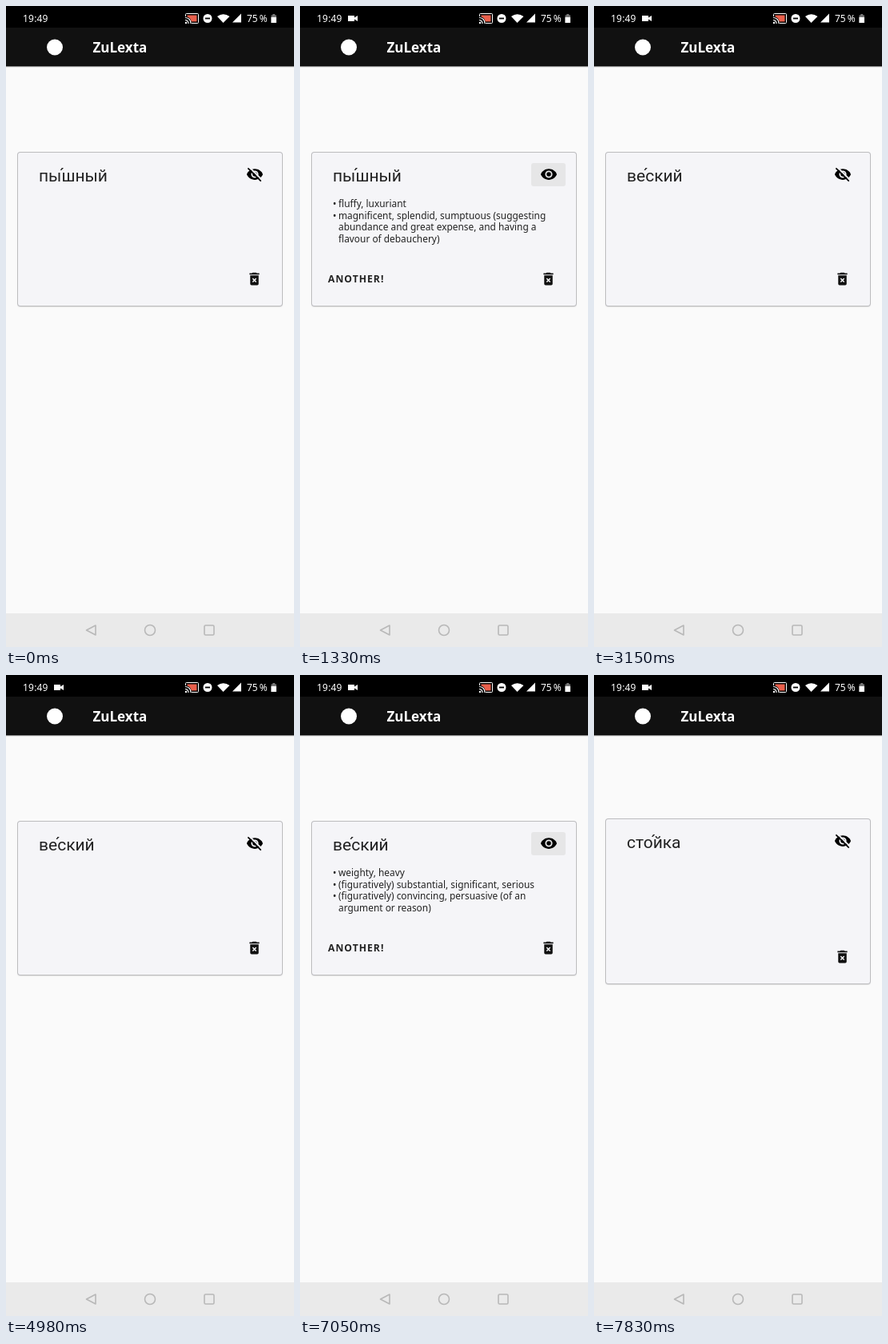
These frames come from a looping animation (360x800 px, 8000 ms). An HTML page:

```html
<!DOCTYPE html>
<html lang="en">
<head>
<meta charset="utf-8">
<title>Vocabulary cards</title>
<style>
  html, body { margin: 0; width: 100%; height: 100%; overflow: hidden; background: #fafafa; }
  * { box-sizing: border-box; }
  body { position: relative; font-family: "Noto Sans", sans-serif; color: #222; }
  .stage { position: absolute; left: 0; top: 0; width: 360px; height: 800px; overflow: hidden; background: #fafafa; }
  .chrome { position: absolute; left: 0; top: 0; }

  .card {
    position: absolute; left: 14px; top: 182px; width: 332px; height: 193px;
    border-radius: 4px; background: #f5f5f8; white-space: nowrap;
    box-shadow: inset 0 0 0 1px #bcbcbe, 0 1px 1px rgba(0, 0, 0, .1);
  }
  .word {
    position: absolute; left: 27px; top: 18px;
    font: 21px/24px Roboto, sans-serif;
  }
  .word i { display: inline-block; width: 0; font-style: normal; position: relative; left: -3px; top: -2px; }
  .defs {
    position: absolute; left: 34px; top: 57.4px; margin: 0; padding: 0;
    list-style: none; font-size: 11.9px; line-height: 14.4px;
  }
  .defs li { position: relative; }
  .defs li::before { content: "•"; position: absolute; left: -7px; }
  .eye { position: absolute; left: 275px; top: 14px; width: 43px; height: 29px; border-radius: 3px; overflow: hidden; }
  .eye svg { position: absolute; left: 10.5px; top: 3.3px; width: 22px; height: 22px; }
  .off { --bg: #f5f5f8; }
  .on { --bg: #e6e6e7; background: var(--bg); }
  .foot { position: absolute; left: 0; bottom: 0; width: 332px; height: 50px; }
  .another {
    position: absolute; left: 13px; top: 1px; width: 86px; height: 30px; padding: 6.5px 8px;
    border-radius: 3px; overflow: hidden; font: 600 12.2px/16.3px "Noto Sans", sans-serif; letter-spacing: 1px;
  }
  .trash { position: absolute; left: 286px; top: 4.5px; width: 21px; height: 21px; }
  .ripple {
    position: absolute; left: 50%; top: 50%; width: 100px; height: 100px; margin: -50px;
    border-radius: 50%; background: #000; opacity: 0;
  }

  /* 1% of the loop is 80 ms */
  .c1, .c2, .c3, .card .eye, .defs, .foot, .another, .ripple, .rec { animation: 8s linear infinite; }
  .card .defs, .card .eye, .card .foot, .card .another { animation-timing-function: step-end; }
  .c1 { animation-name: slide1, fold1; animation-timing-function: linear, step-end; }
  .c2 { animation-name: slide2, fold2; animation-timing-function: linear, step-end; }
  .c3 { top: 179px; height: 207px; animation-name: slide3; }
  .c1 .defs, .c1 .on, .c1 .another { animation-name: show1; }
  .c2 .defs, .c2 .on, .c2 .another { animation-name: show2; }
  .c1 .off { animation-name: hide1; }
  .c2 .off { animation-name: hide2; }
  .c1 .foot { animation-name: drop1; }
  .c2 .foot { animation-name: drop2; }
  .c1 .on .ripple { animation-name: tapEye1; }
  .c2 .on .ripple { animation-name: tapEye2; }
  .c1 .another .ripple { animation-name: tapNext1; }
  .c2 .another .ripple { animation-name: tapNext2; }
  .rec { animation-name: rec; }

  @keyframes rec { 0%, .75% { opacity: 0; } 3.75%, 100% { opacity: 1; } }

  @keyframes show1 { 0% { opacity: 0; } 11.25%, 100% { opacity: 1; } }
  @keyframes hide1 { 0% { opacity: 1; } 11.25%, 100% { opacity: 0; } }
  @keyframes show2 { 0% { opacity: 0; } 63.3%, 100% { opacity: 1; } }
  @keyframes hide2 { 0% { opacity: 1; } 63.3%, 100% { opacity: 0; } }

  @keyframes drop1 { 0% { opacity: 1; } 34.6%, 100% { opacity: 0; } }
  @keyframes drop2 { 0% { opacity: 1; } 92.35%, 100% { opacity: 0; } }
  @keyframes fold1 { 0% { top: 182px; height: 193px; } 34.6%, 100% { top: 187px; height: 166px; } }
  @keyframes fold2 { 0% { top: 182px; height: 193px; } 92.35%, 100% { top: 187px; height: 166px; } }

  @keyframes slide1 {
    0% { transform: none; }
    35.5% { transform: none; animation-timing-function: ease-in; }
    37.4%, 100% { transform: translateX(-362px); }
  }
  @keyframes slide2 {
    0%, 37.3% { transform: translateX(362px); animation-timing-function: ease-out; }
    39.3% { transform: none; }
    93.25% { transform: none; animation-timing-function: ease-in; }
    95.3%, 100% { transform: translateX(-362px); }
  }
  @keyframes slide3 {
    0%, 95.2% { transform: translateX(362px); animation-timing-function: ease-out; }
    97.8%, 100% { transform: none; }
  }

  @keyframes tapEye1 {
    0%, 10.3% { transform: scale(0); opacity: .14; }
    13% { transform: scale(.55); opacity: .1; }
    14.75%, 100% { transform: scale(.55); opacity: 0; }
  }
  @keyframes tapEye2 {
    0%, 62.3% { transform: scale(0); opacity: .14; }
    65.2% { transform: scale(.55); opacity: .1; }
    67.1%, 100% { transform: scale(.55); opacity: 0; }
  }
  @keyframes tapNext1 {
    0%, 30.4% { transform: scale(0); opacity: .12; }
    33% { transform: scale(1); opacity: .1; }
    34.6%, 100% { transform: scale(1); opacity: 0; }
  }
  @keyframes tapNext2 {
    0%, 88.3% { transform: scale(0); opacity: .12; }
    90.8% { transform: scale(1); opacity: .1; }
    92.35%, 100% { transform: scale(1); opacity: 0; }
  }
</style>
</head>
<body>
<svg width="0" height="0" style="position:absolute">
  <symbol id="open" viewBox="0 0 24 24">
    <path d="M1 12C2.7 7.6 7 4.5 12 4.5S21.3 7.6 23 12C21.3 16.4 17 19.5 12 19.5S2.7 16.4 1 12Z"/>
    <circle cx="12" cy="12" r="4" fill="none" style="stroke:var(--bg)" stroke-width="2"/>
  </symbol>
  <symbol id="shut" viewBox="0 0 24 24">
    <use href="#open"/>
    <path d="M4.2 2L22.6 20.4" style="stroke:var(--bg)" stroke-width="2"/>
    <path d="M2.6 3.6L20.4 21.4" stroke="#000" stroke-width="1.8"/>
  </symbol>
  <symbol id="bin" viewBox="0 0 24 24">
    <path d="M6 7H18V19Q18 21 16 21H8Q6 21 6 19ZM5 4H8.5L9.5 3H14.5L15.5 4H19V6H5Z" fill="#111"/>
    <path d="M9.5 11.5L14.5 16.5M14.5 11.5L9.5 16.5" stroke="#f5f5f8" stroke-width="1.8"/>
  </symbol>
</svg>

<div class="stage">
  <section class="card c1">
    <div class="word">пы<i>´</i>шный</div>
    <div class="eye off"><svg><use href="#shut"/></svg></div>
    <div class="eye on"><svg><use href="#open"/></svg><span class="ripple"></span></div>
    <ul class="defs">
      <li>fluffy, luxuriant</li>
      <li>magnificent, splendid, sumptuous (suggesting<br>abundance and great expense, and having a<br>flavour of debauchery)</li>
    </ul>
    <div class="foot">
      <div class="another">ANOTHER!<span class="ripple"></span></div>
      <svg class="trash"><use href="#bin"/></svg>
    </div>
  </section>

  <section class="card c2">
    <div class="word">ве<i>´</i>ский</div>
    <div class="eye off"><svg><use href="#shut"/></svg></div>
    <div class="eye on"><svg><use href="#open"/></svg><span class="ripple"></span></div>
    <ul class="defs">
      <li>weighty, heavy</li>
      <li>(figuratively) substantial, significant, serious</li>
      <li>(figuratively) convincing, persuasive (of an<br>argument or reason)</li>
    </ul>
    <div class="foot">
      <div class="another">ANOTHER!<span class="ripple"></span></div>
      <svg class="trash"><use href="#bin"/></svg>
    </div>
  </section>

  <section class="card c3">
    <div class="word">сто<i>´</i>йка</div>
    <div class="eye off"><svg><use href="#shut"/></svg></div>
    <div class="foot"><svg class="trash"><use href="#bin"/></svg></div>
  </section>

  <svg class="chrome" width="360" height="800" viewBox="0 0 360 800" font-family="'Noto Sans', sans-serif" fill="#fff">
    <rect y="75" width="360" height="1" fill="#8a8a8a"/>
    <rect y="76" width="360" height="1" fill="#e8e8e8"/>
    <rect width="360" height="75" fill="#111"/>
    <rect width="360" height="27" fill="#000"/>

    <!-- status bar -->
    <text x="21" y="19.5" font-size="12" letter-spacing=".2">19:49</text>
    <path class="rec" d="M60 12H68V14.5L72 12V19L68 16.5V19H60Z"/>
    <rect x="224.5" y="9.5" width="16" height="12" rx="1" fill="none" stroke="#fff"/>
    <rect x="226.5" y="11.5" width="12" height="8" fill="#e9604c"/>
    <path d="M223 13H225Q232 14 232 22.5H223Z" fill="#000"/>
    <path d="M224 14.5Q231 15 231 22M224 17.5Q228 18 228 22" fill="none" stroke="#fff" stroke-width="1.2"/>
    <circle cx="225" cy="21" r="1.2"/>
    <circle cx="252" cy="15.5" r="5.5"/>
    <rect x="249" y="14.6" width="6" height="1.8" fill="#000"/>
    <path d="M271.5 21L264 13Q271.5 7.5 279.5 13Z"/>
    <path d="M283 20.5L294 9.5V20.5Z"/>
    <text x="301" y="19.5" font-size="12">75<tspan dx="2">%</tspan></text>
    <path d="M331.5 11.5H333.3V10H336.2V11.5H338V21H331.5Z" fill="#777"/>
    <rect x="331.5" y="14" width="6.5" height="7"/>

    <!-- app bar -->
    <circle cx="61" cy="51.5" r="10"/>
    <text x="108.5" y="57.5" font-size="17" font-weight="600">ZuLexta</text>

    <!-- navigation bar -->
    <rect y="758" width="360" height="42" fill="#eaeaea"/>
    <g fill="none" stroke="#b8b8b8" stroke-width="1.6" stroke-linejoin="round">
      <path d="M100.5 779L112 773V785Z"/>
      <circle cx="180" cy="779" r="6.5"/>
      <rect x="248" y="773" width="12" height="12" rx="1.5"/>
    </g>
  </svg>
</div>
</body>
</html>
```
